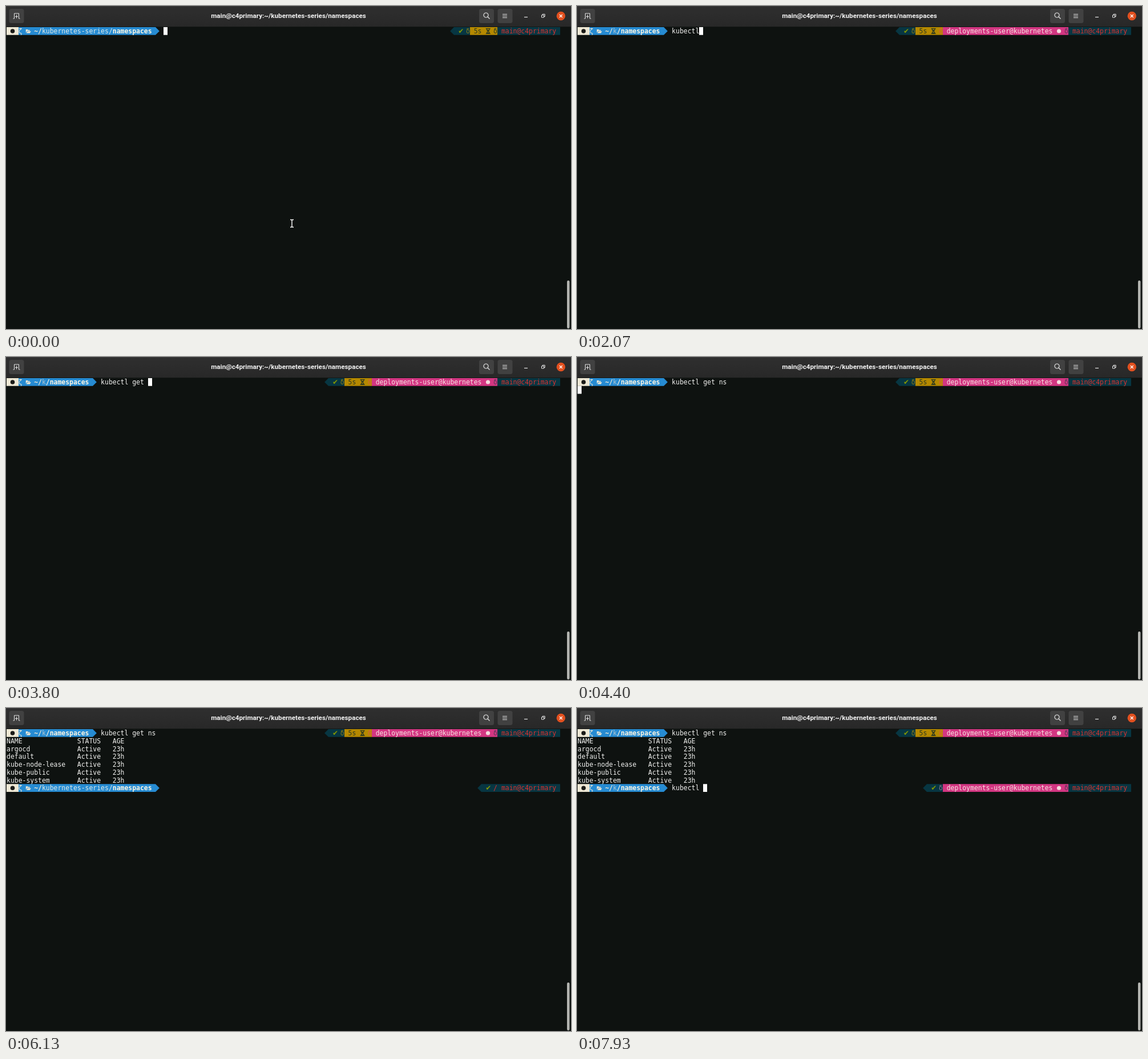
Recreate the animation shown at these times as an HTML page with a canvas. Size 990 by 566 pixels, loop 8000 ms.

```html
<!DOCTYPE html>
<html lang="en">
<head>
<meta charset="utf-8">
<title>Terminal</title>
<style>
html, body { margin: 0; width: 100%; height: 100%; overflow: hidden; background: #0e1210; }
canvas { display: block; }
</style>
</head>
<body>
<canvas id="stage" width="990" height="566"></canvas>
<script>
const ctx = document.getElementById('stage').getContext('2d');
const LOOP = 8000, CELL = 6.88, LINE = 13.75, TOP = 37;
const HOST = 'main@c4primary', CONTEXT = 'deployments-user@kubernetes';
const MONO = '11.43px "DejaVu Sans Mono", monospace';
const C = {
  bg: '#0e1210', text: '#f2f2f0', cream: '#eee8d5', blue: '#268bd2', teal: '#073642',
  gold: '#b58900', pink: '#d33682', red: '#dc322f', green: '#859900'
};
const COMMAND = 'kubectl get ns';
const OUTPUT = [
  'NAME              STATUS   AGE',
  ...['argocd', 'default', 'kube-node-lease', 'kube-public', 'kube-system']
    .map(name => name.padEnd(18) + 'Active   23h')
];
const ENTER = 4400, DONE = 4470, LAST_ROW = 7;

// Key presses and cursor blinks: [time, typed text, cursor hidden]
const FIRST = [
  [0, ''], [70, 'k'], [670, 'ku'], [1200, 'ku', true], [1330, 'kub'], [1470, 'kube'],
  [1600, 'kubec'], [1800, 'kubect'], [2070, 'kubectl'], [2200, 'kubectl '],
  [2400, 'kubectl g'], [2530, 'kubectl ge'], [2730, 'kubectl get '],
  [3070, 'kubectl get n'], [3670, 'kubectl get n', true], [3800, 'kubectl get '],
  [4130, 'kubectl get n'], [4270, COMMAND], [ENTER, COMMAND, true]
];
const SECOND = [
  [DONE, ''], [4930, '', true], [5530, ''], [6130, '', true], [6530, 'k'], [6800, 'ku'],
  [7070, 'kub'], [7130, 'kube'], [7270, 'kubec'], [7470, 'kubect'],
  [7730, 'kubectl'], [7930, 'kubectl ']
];

const colX = col => 1 + col * CELL;
const rowY = row => TOP + row * LINE;

function rect(x, y, w, h, color) {
  ctx.fillStyle = color;
  ctx.fillRect(x, y, w, h);
}

function disc(x, y, r, color) {
  ctx.fillStyle = color;
  ctx.beginPath();
  ctx.arc(x, y, r, 0, 7);
  ctx.fill();
}

function roundBox(x, y, w, h, r, color) {
  ctx.fillStyle = color;
  ctx.beginPath();
  ctx.roundRect(x, y, w, h, r);
  ctx.fill();
}

function shape(path, x, y, color, width) {
  ctx.save();
  ctx.translate(x, y);
  const p = new Path2D(path);
  if (width) {
    ctx.strokeStyle = color;
    ctx.lineWidth = width;
    ctx.stroke(p);
  } else {
    ctx.fillStyle = color;
    ctx.fill(p);
  }
  ctx.restore();
}

// Text sits on the character grid, one glyph per cell.
function print(text, col, row, color = C.text, bold = false) {
  ctx.font = (bold ? 'bold ' : '') + MONO;
  ctx.fillStyle = color;
  [...text].forEach((ch, i) => ctx.fillText(ch, colX(col + i), rowY(row) + 11));
}

function band(from, to, row, color) {
  const x = Math.round(colX(from));
  rect(x, rowY(row), Math.round(colX(to)) - x, LINE, color);
}

function arrow(col, row, dir, color) {
  shape(`M0 0L${dir * CELL} ${LINE / 2}L0 ${LINE}Z`, Math.round(colX(col)), rowY(row), color);
}

function leftPrompt(row, short) {
  const y = rowY(row), end = short ? 22 : 38;
  band(0, 3, row, C.cream);
  disc(11.5, y + 7, 3.8, '#1b1b18');
  band(3, end, row, C.blue);
  arrow(end, row, 1, C.blue);
  print('ζ', 3, row, C.cream);
  shape('M0 7V1H3L4 2H7V3.4H2.5L0 7ZM3 4.2H9L7 7.5H1Z', 34.8, y + 3, C.cream);
  print('~/', 7, row, C.cream, true);
  if (short) {
    print('k', 9, row, '#a9c4d2');
    print('/namespaces', 10, row, '#fdf6e3', true);
  } else {
    print('kubernetes-series/', 9, row, '#dfe9e6');
    print('namespaces', 27, row, '#fdf6e3', true);
  }
}

function rightPrompt(row, short, timed) {
  const y = rowY(row), dark = '#2d3a20';
  const end = short ? 93 : 125;
  const tealEnd = timed ? end - 7 : end;
  band(tealEnd - 4, tealEnd, row, C.teal);
  arrow(tealEnd - 4, row, -1, C.teal);
  ctx.font = '12px "DejaVu Sans", sans-serif';
  ctx.fillStyle = C.green;
  ctx.fillText('✔', colX(tealEnd - 3), y + 11);
  if (timed || short) print('δ', tealEnd - 1, row, timed ? '#82791c' : '#83768a');
  else print('/', tealEnd - 1, row, C.red);

  if (timed) {
    band(tealEnd, end, row, C.gold);
    print('5s', end - 6, row, dark);
    shape('M0 .7H8M0 9.3H8M1.5 1Q1.5 3.5 4 5Q1.5 6.5 1.5 9M6.5 1Q6.5 3.5 4 5Q6.5 6.5 6.5 9M3 3.4H5M2.5 8.2H5.5',
      colX(end - 3) + .4, y + 2, dark, 1.3);
    print('δ', end - 1, row, short ? '#d2603e' : dark);
  }
  band(125, 141, row, C.teal);
  if (short) {
    band(93, 125, row, C.pink);
    print(CONTEXT, 94, row, '#f6e4e2');
    disc(844.5, y + 7, 3.6, '#f3d9dc');
    print('δ', 124, row, '#5b3659');
  }
  print(HOST, 126, row, C.red);
}

function header() {
  const shade = ctx.createLinearGradient(0, 0, 0, 36);
  shade.addColorStop(0, '#2f2f2f');
  shade.addColorStop(1, '#282828');
  rect(0, 0, 990, 36, shade);
  rect(0, 0, 990, 1, '#3a3a3a');
  rect(0, 36, 990, 1, '#151816');

  for (const x of [5.5, 829, 861.5]) roundBox(x, 5, 26, 25, 3.5, '#414141');
  const ink = '#e4e4e4';
  shape('M0 9.5H2V.5H10V9.5H12M6 3V9M3.5 6H8.5', 12.5, 12.5, ink, 1);
  shape('M8 4A4 4 0 1 1 0 4A4 4 0 1 1 8 4M7 7L10.5 10.5', 837, 12, ink, 1.2);
  shape('M0 .5H8M0 3.5H8M0 6.5H8', 870, 14, ink, 1);
  shape('M0 0H6', 908, 19.5, ink, 1.2);
  shape('M0 2H4V6H0ZM1.5 2V.3H5.7V4.5H4', 938.5, 14, ink, 1);
  disc(972.3, 17.5, 7.7, '#e2501f');
  shape('M0 0L5 5M5 0L0 5', 969.8, 15, '#fff', 1.2);

  ctx.font = 'bold 11.7px Roboto, "Open Sans", sans-serif';
  ctx.fillStyle = '#f2f2f2';
  ctx.textAlign = 'center';
  ctx.fillText(HOST + ':~/kubernetes-series/namespaces', 495, 21.3);
  ctx.textAlign = 'left';
}

function cursor(col, row) {
  rect(Math.round(colX(col)), rowY(row), 7, LINE, '#fff');
}

function commandLine(row, steps, t, timed) {
  const [, text, hidden] = steps.findLast(step => step[0] <= t);
  const short = text.startsWith('kubectl'), start = short ? 24 : 40;
  leftPrompt(row, short);
  rightPrompt(row, short, timed);
  print(text, start, row);
  if (!hidden) cursor(start + text.length, row);
}

function draw(t) {
  rect(0, 0, 990, 566, C.bg);
  header();
  commandLine(0, FIRST, t, true);
  if (t >= DONE) {
    OUTPUT.forEach((line, i) => print(line, 0, i + 1));
    commandLine(LAST_ROW, SECOND, t, false);
  } else if (t >= ENTER) {
    cursor(0, 1);
  }
  if (t < 70) {
    const beam = 'M0 0H2L3 1L4 0H6M3 1V12M0 13H2L3 12L4 13H6';
    shape(beam, 498, 374.5, '#fff', 1.4);
  }
  roundBox(983, 481, 4.5, 84, 2.2, '#b3b4b0');
}

const began = performance.now();
function tick() {
  draw((performance.now() - began) % LOOP);
  requestAnimationFrame(tick);
}
tick();
</script>
</body>
</html>
```
